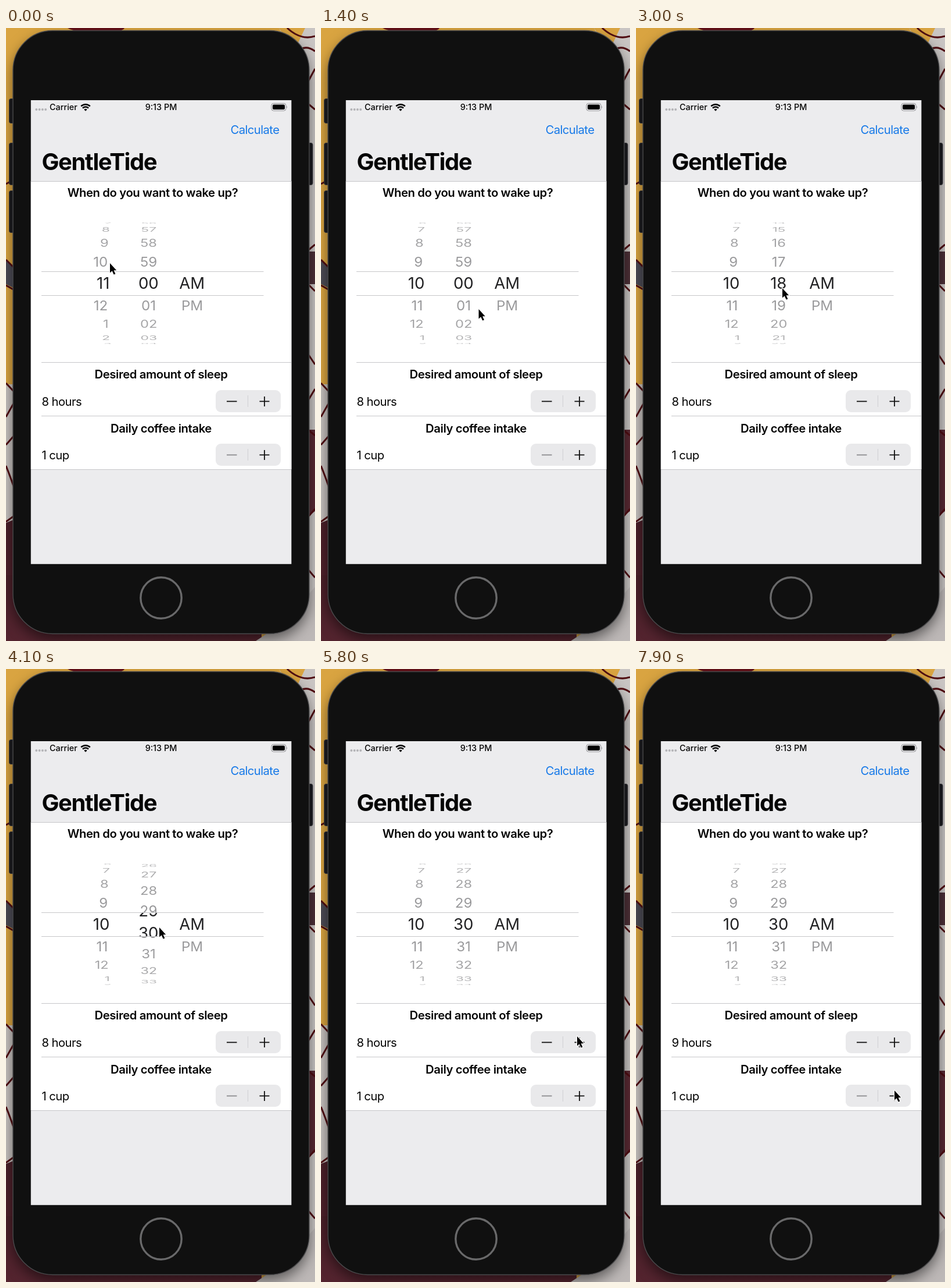
Animation, 532 px wide and 1053 px high, one loop 8000 ms. Source, as an HTML page:

```html
<!DOCTYPE html>
<html lang="en">
<head>
<meta charset="utf-8">
<title>Wake-up time picker</title>
<style>
html, body { margin: 0; width: 100%; height: 100%; overflow: hidden; background: #4a1f2b; }
svg { display: block; width: 100%; height: 100%; }
text { font-family: Inter, "Liberation Sans", sans-serif; fill: #050505; }
.body { font-size: 20.3px; letter-spacing: -.6px; }
.head { font-size: 20.3px; font-weight: 600; letter-spacing: -.4px; text-anchor: middle; }
.status { font-size: 14.4px; font-weight: 500; }
.title { font-size: 40px; font-weight: 700; letter-spacing: -1.4px; }
.row { font-size: 24.3px; fill: #969698; }
.picked { font-size: 27.6px; fill: #222224; }
.rule { stroke: #c6c6c9; stroke-width: 1; }
.ink { stroke: #500d12; stroke-width: 3; fill: none; }
.case { filter: drop-shadow(0 10px 11px rgba(0, 0, 0, .5)); }
</style>
</head>
<body>
<svg viewBox="0 0 532 1053" preserveAspectRatio="none">
  <defs>
    <clipPath id="around">
      <path d="M43 333H491V418H43ZM43 460H491V545H43Z"/>
    </clipPath>
    <clipPath id="band"><path d="M43 418.5H491V459.5H43Z"/></clipPath>
    <linearGradient id="maroon" x2="0" y2="1">
      <stop stop-color="#4b2029"/><stop offset="1" stop-color="#54242f"/>
    </linearGradient>
    <g id="stepper">
      <rect x="361" width="112" height="38" rx="9" fill="#e9e9eb"/>
      <path d="M416.5 9V29" stroke="#cfcfd2"/>
      <path d="M436.5 19.4H453.5M445 10.9V27.9" stroke="#111" stroke-width="1.8"/>
    </g>
  </defs>

  <!-- wallpaper -->
  <rect width="532" height="1053" fill="#d9a441"/>
  <path d="M106 0Q120 8 160 8T204 0Z" fill="#651018"/>
  <path d="M0 400L16 412V448L0 440Z" fill="#4d4b55"/>
  <path d="M0 612H30V860H0Z" fill="#c6c1be"/>
  <path d="M0 850L30 838V1053H0Z" fill="url(#maroon)"/>
  <path d="M0 940H440V1053H0Z" fill="url(#maroon)"/>
  <path d="M492 0L470 0L500 60V1053H532V0Z" fill="#c9c5c3"/>
  <path d="M470 0H515L496 40Z" fill="#d9a441"/>
  <path d="M510 384H532V440H510Z" fill="#4d3037"/>
  <path d="M510 690H532V830L510 846Z" fill="#5a2a33"/>
  <path d="M430 1053L480 1020L532 960V1053Z" fill="#bdb8b7"/>
  <path class="ink" d="M0 268L14 260M0 398L14 412M0 442L14 450M0 610L14 625M0 668Q10 650 16 640M0 716L14 700M0 752Q9 775 14 790M0 848L14 838M484 0Q508 22 532 14M497 44Q514 26 532 40M518 96L532 70M520 130L532 140M520 382L532 372M520 440L532 452M520 560L532 578M520 640L532 620M520 690L532 700M520 840L532 826M520 930L532 944"/>

  <!-- phone -->
  <rect class="case" x="12" y="4.5" width="510" height="1036" rx="68"/>
  <g fill="#17171a" stroke="#37373a">
    <rect x="5.5" y="121.5" width="14" height="42" rx="3"/>
    <rect x="5.5" y="197.5" width="14" height="72" rx="3"/>
    <rect x="5.5" y="279.5" width="14" height="72" rx="3"/>
    <rect x="514" y="197.5" width="14" height="72" rx="3"/>
  </g>
  <rect x="12" y="4.5" width="510" height="1036" rx="68" fill="#101010" stroke="#4a4a4c" stroke-width="1.4"/>
  <circle cx="267" cy="979" r="35.2" fill="none" stroke="#69696a" stroke-width="3.4"/>

  <!-- screen -->
  <rect x="42.8" y="124" width="448.6" height="796.8" fill="#ececee"/>
  <rect x="42.8" y="263" width="448.6" height="495" fill="#fff"/>
  <path class="rule" d="M43 263.5H491M61 574.5H491M61 666.5H491M43 758.5H491"/>

  <g fill="#b4b4b7">
    <circle cx="52.3" cy="140" r="2"/><circle cx="57.6" cy="140" r="2"/>
    <circle cx="62.9" cy="140" r="2"/><circle cx="68.2" cy="140" r="2"/>
  </g>
  <text class="status" x="75" y="141">Carrier</text>
  <g fill="none" stroke="#000" stroke-width="2.5">
    <path d="M129.2 134.4A11.2 11.2 0 0 1 144.8 134.4M132 137.6A7 7 0 0 1 142 137.6"/>
    <path d="M137 142.8L134.4 140A3.8 3.8 0 0 1 139.6 140Z" fill="#000" stroke="none"/>
  </g>
  <text class="status" x="267" y="141" text-anchor="middle">9:13 PM</text>
  <rect x="457" y="129.5" width="25" height="12.6" rx="3.6" fill="none" stroke="#8c8c8f"/>
  <rect x="459" y="131.5" width="21" height="8.6" rx="2" fill="#000"/>
  <path d="M483.4 133.8Q485.2 135.8 483.4 137.8Z" fill="#8c8c8f"/>

  <text class="body" x="386.5" y="182" style="fill:#1679e8">Calculate</text>
  <text class="title" x="61.5" y="244">GentleTide</text>
  <text class="head" x="252.5" y="290">When do you want to wake up?</text>

  <g id="rows" clip-path="url(#around)"></g>
  <g id="picked" clip-path="url(#band)"></g>
  <path class="rule" d="M61 418.5H443.5M61 459.5H443.5"/>

  <text class="head" x="267" y="602">Desired amount of sleep</text>
  <text class="body" id="sleep" x="61.5" y="648.5">8 hours</text>
  <use href="#stepper" y="622"/>
  <path d="M380 641.4H397.5" stroke="#111" stroke-width="1.8"/>
  <text class="head" x="267" y="694.5">Daily coffee intake</text>
  <text class="body" x="61.5" y="741">1 cup</text>
  <use href="#stepper" y="714"/>
  <path d="M380 733.4H397.5" stroke="#8b8b8e" stroke-width="1.8"/>

  <path id="cursor" d="M0 0V16.6L3.7 13.2L6.6 19.6L9.4 18.4L6.6 12.2H11.2Z" fill="#000" stroke="#fff" stroke-width="2.4" paint-order="stroke" stroke-linejoin="round"/>
</svg>
<script>
const LOOP = 8000, STEP = 100;
const MID_X = 252, MID_Y = 439, RADIUS = 104, PITCH = 21.1 * Math.PI / 180;
const $ = id => document.getElementById(id);
const mod = (n, m) => (n % m + m) % m;

const smooth = u => u * u * (3 - 2 * u);
const linear = u => u;
const out = p => u => 1 - (1 - u) ** p;
const into = p => u => u ** p;

// Each key is [time, values, easing that leads to it].
function at(keys, t) {
  const i = keys.findIndex(k => k[0] > t);
  if (i < 0) return keys[keys.length - 1][1];
  if (i === 0) return keys[0][1];
  const [t0, a] = keys[i - 1], [t1, b, ease = smooth] = keys[i];
  const u = ease((t - t0) / (t1 - t0));
  return a.map((v, j) => v + (b[j] - v) * u);
}

const pointer = [
  [0, [179, 404]], [100, [179, 404]], [700, [182, 442]], [800, [182, 442]],
  [1400, [271.5, 483]], [1600, [271.5, 483]], [2100, [261, 404]], [2300, [260, 404]],
  [3000, [252, 447]], [3100, [252, 447]], [3400, [257, 385]], [3600, [258, 385]],
  [4100, [264, 444]], [4500, [264, 444]], [5400, [441, 631]], [6400, [441, 631]],
  [7300, [445, 724]]
];
const hour = [[100, [11]], [700, [10]]];
const minute = [
  [1600, [0]], [2100, [2.2], into(2)], [2300, [7.18], linear], [2900, [18], out(1.4)],
  [3100, [18]], [3400, [20.5], into(2)], [4300, [30], out(2.15)]
];

function textIn(parent, cls, anchor) {
  const el = document.createElementNS('http://www.w3.org/2000/svg', 'text');
  el.setAttribute('class', cls);
  el.setAttribute('text-anchor', anchor);
  return $(parent).appendChild(el);
}

function wheel(x, pickedX, anchor, label) {
  const make = (id, cls, n) => Array.from({ length: n }, () => textIn(id, cls, anchor));
  const rows = make('rows', 'row', 11), picked = make('picked', 'picked', 3);
  return pos => {
    const place = (el, j, half, draw) => {
      const n = Math.round(pos) + j - half, angle = (n - pos) * PITCH;
      el.textContent = Math.cos(angle) > .02 ? label(n) : '';
      draw(el, MID_Y + RADIUS * Math.sin(angle), Math.cos(angle));
    };
    rows.forEach((el, j) => place(el, j, 5, (el, y, c) => {
      el.setAttribute('x', x - MID_X);
      el.setAttribute('y', 8.7);
      el.setAttribute('transform', `translate(${MID_X} ${y}) scale(${.9 + .1 * c} ${Math.max(c, .01)})`);
      el.setAttribute('opacity', .5 + .5 * Math.max(c, 0));
    }));
    picked.forEach((el, j) => place(el, j, 1, (el, y) => {
      el.setAttribute('x', pickedX);
      el.setAttribute('y', y + 9.3);
    }));
  };
}

const hours = wheel(174.7, 178.4, 'end', n => mod(n - 1, 12) + 1);
const minutes = wheel(245.5, 245.3, 'middle', n => String(mod(n, 60)).padStart(2, '0'));
const halves = wheel(321, 320.3, 'middle', n => ['AM', 'PM'][n] || '');
halves(0);

function draw(t) {
  hours(at(hour, t)[0]);
  minutes(at(minute, t)[0]);
  $('sleep').textContent = (t < 6100 ? 8 : 9) + ' hours';
  $('cursor').setAttribute('transform', `translate(${at(pointer, t).join(' ')})`);
}

const start = performance.now();
let last = -1;
function tick() {
  const t = Math.floor((performance.now() - start) % LOOP / STEP) * STEP;
  if (t !== last) draw(last = t);
  requestAnimationFrame(tick);
}
tick();
</script>
</body>
</html>
```
